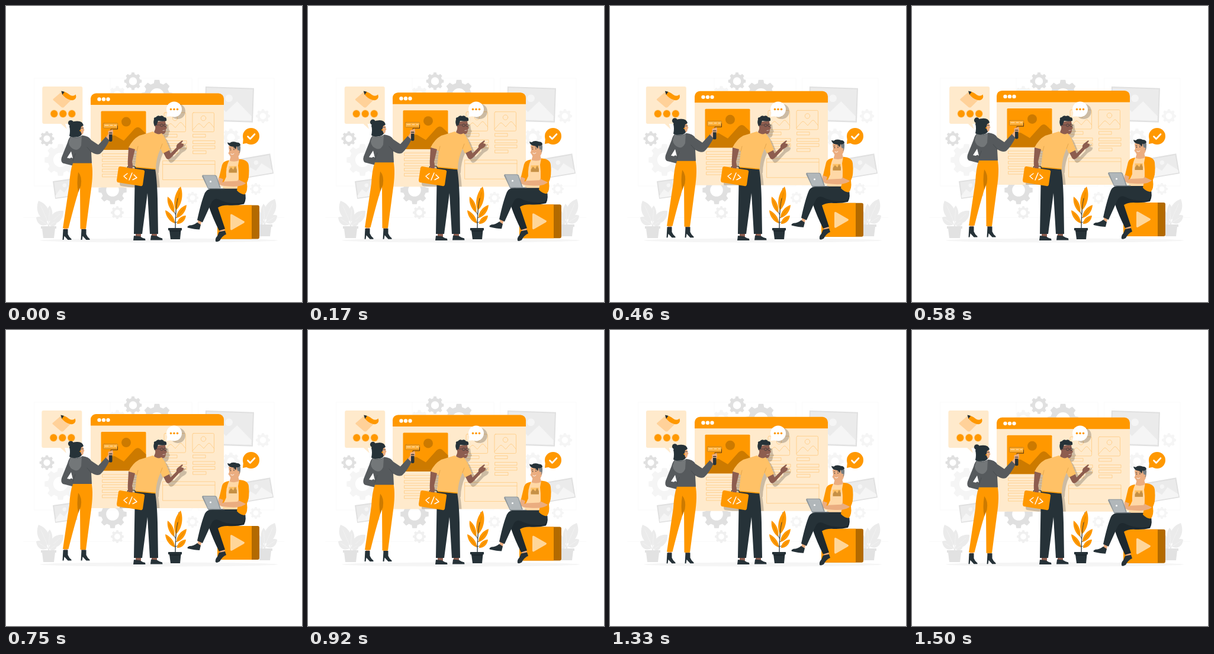
Recreate the animation shown at these times as an HTML page with a canvas. Size 500 by 500 pixels, loop 1540 ms.

```html
<!DOCTYPE html>
<html lang="en">
<head>
<meta charset="utf-8">
<title>Web design team</title>
<style>
  html, body { margin: 0; width: 100%; height: 100%; overflow: hidden; background: #fff; }
  canvas { display: block; width: 100vw; height: 100vh; }
</style>
</head>
<body>
<canvas id="stage"></canvas>
<script>
const LOOP = 1540, LEAD = 55, RISE = 6.2;
const ORANGE = '#ff9800', BROWN = '#cc7a00', CREAM = '#ffeacc', PEACH = '#ffc166',
      LINE = '#ffcb80', DARK = '#263238', GREY = '#e0e0e0', PALE = '#f5f5f5',
      SKIN = '#8d5d4f', TAN = '#ebad80', SHADE = 'rgba(0,0,0,.2)';

const canvas = document.getElementById('stage');
const ctx = canvas.getContext('2d');

const fill = (d, color) => { ctx.fillStyle = color; ctx.fill(new Path2D(d)); };

function line(d, color, width = 1) {
  ctx.strokeStyle = color;
  ctx.lineWidth = width;
  ctx.lineCap = ctx.lineJoin = 'round';
  ctx.stroke(new Path2D(d));
}

function box(x, y, w, h, r, color) {
  ctx.beginPath();
  ctx.roundRect(x, y, w, h, r);
  ctx.fillStyle = color;
  ctx.fill();
}

function frame(x, y, w, h, color = LINE, r = 0) {
  ctx.beginPath();
  ctx.roundRect(x, y, w, h, r);
  ctx.strokeStyle = color;
  ctx.lineWidth = 0.8;
  ctx.stroke();
}

function oval(x, y, rx, color, ry = rx) {
  ctx.beginPath();
  ctx.ellipse(x, y, rx, ry, 0, 0, Math.PI * 2);
  ctx.fillStyle = color;
  ctx.fill();
}

function moved(x, y, angle, draw) {
  ctx.save();
  ctx.translate(x, y);
  ctx.rotate(angle);
  draw();
  ctx.restore();
}

function gear(x, y, r, color, turn = 0) {
  const teeth = 8, step = Math.PI * 2 / teeth;
  ctx.beginPath();
  for (let i = 0; i < teeth; i++) {
    [[-0.32, 0.8], [-0.2, 1], [0.2, 1], [0.32, 0.8]].forEach(([a, k]) => {
      const angle = (i + a) * step + turn;
      ctx.lineTo(x + Math.cos(angle) * r * k, y + Math.sin(angle) * r * k);
    });
  }
  ctx.closePath();
  ctx.moveTo(x + r * 0.45, y);
  ctx.arc(x, y, r * 0.45, 0, Math.PI * 2);
  ctx.fillStyle = color;
  ctx.fill('evenodd');
}

function photo(x, y, w, h, angle) {
  moved(x, y, angle, () => {
    box(0, 0, w, h, 0, GREY);
    box(2, 2, w - 4, h - 4, 0, '#ebebeb');
    oval(w * 0.49, h * 0.32, h * 0.11, PALE);
    ctx.beginPath();
    [[0.03, 0.82], [0.27, 0.5], [0.44, 0.72], [0.66, 0.4], [0.97, 0.82], [0.97, 0.95], [0.03, 0.95]]
      .forEach(([u, v]) => ctx.lineTo(u * w, v * h));
    ctx.fillStyle = PALE;
    ctx.fill();
  });
}

function leaf(x, y, tipX, tipY, width, color, vein) {
  const dx = tipX - x, dy = tipY - y, len = Math.hypot(dx, dy);
  moved(x, y, Math.atan2(dy, dx), () => {
    fill(`M0 0C${len * 0.25} ${-width} ${len * 0.7} ${-width} ${len} 0C${len * 0.7} ${width} ${len * 0.25} ${width} 0 0`, color);
    if (vein) line(`M0 0H${len * 0.75}`, vein, 0.6);
  });
}

function greyPlant(x, y, side) {
  ctx.save();
  ctx.translate(x, y);
  ctx.scale(side, 1);
  line('M0 0Q2 -18 -9 -28M0 0Q3 -14 14 -19M0 0Q-4 -11 -13 -12', '#e8e8e8', 1);
  [[-17, -43, 12], [-21, -15, 9], [2, -35, 7], [25, -26, 11], [14, -9, 7]]
    .forEach(([u, v, w]) => leaf(u * 0.1, v * 0.2, u, v, w, '#ebebeb', PALE));
  fill('M-13 0H13V4H11L9 20H-9L-11 4H-13Z', '#e2e2e2');
  ctx.restore();
}

function background() {
  frame(48, 122, 266, 182, '#f9f9f9');
  frame(325, 122, 128, 182, '#f9f9f9');
  line('M176 122V150', '#fafafa', 0.8);
  line('M30 357H470', '#f9f9f9', 0.8);
  gear(188, 150, 15, PALE);
  gear(92, 260, 27, PALE);
  gear(380, 222, 15, PALE);
  gear(434, 186, 12, PALE);
  gear(422, 309, 10, PALE);
  gear(315, 324, 10, PALE);
  gear(188, 349, 11, '#f0f0f0');
  gear(214.5, 127, 15, GREY);
  gear(255, 151, 26.5, GREY);
  gear(69, 224, 12.5, GREY);
  gear(180, 311, 24, GREY);
  photo(337, 136, 82, 58, 0.035);
  photo(396, 258, 51, 34, -0.17);
  photo(79, 296, 38, 30, -0.14);
  greyPlant(72, 372, 1);
  greyPlant(437, 369, -1);
  oval(258, 396, 201, PALE, 3.5);
}

function browser() {
  box(143, 148, 225, 159, [9, 9, 0, 0], CREAM);
  box(143, 148, 225, 19.5, [9, 9, 0, 0], ORANGE);
  [157.5, 165, 172.5].forEach(x => oval(x, 158, 3.2, '#fff'));

  box(160.5, 178, 76, 65.5, 1.5, ORANGE);
  oval(203, 196, 8, BROWN);
  fill('M161 237L178 221Q182 217 187 221L199 228L217 208Q222 203 227 207L236.5 216V243.5H161Z', BROWN);
  for (let i = 0; i < 5; i++) frame(163, 250 + i * 8.6, 73, 4.8);

  [267, 315].forEach(x => {
    frame(x, 180.5, 36.5, 32.5, LINE, 2);
    ctx.beginPath();
    ctx.arc(x + 18.5, 190, 4.2, 0, Math.PI * 2);
    ctx.stroke();
    line(`M${x} 210l9-10q2-2 4 0l6 6 7-8q2-2 4 0l6.5 8`, LINE, 0.8);
    frame(x + 1, 217, 21, 5);
    frame(x + 1, 228, 37, 5);
    frame(x + 1, 236.5, 37, 5);
    frame(x + 1, 245, 22, 5);
  });
  frame(265, 262, 88, 32);
  line('M265 268H353', LINE, 0.8);
}

function brushBubble() {
  fill('M92 198L103 208L100 198Z', CREAM);
  box(61.5, 136, 68, 63, 3, CREAM);
  fill('M80 159Q79 158 80 157L94 145L110 159L98 171Q96 172 94 171Z', '#ffd199');
  fill('M95 144Q102 145 107 149.5Q113 154 118 149.5Q120 156 115 158.500Q112 160 108 158.5Q100 156 95 149Z', ORANGE);
  fill('M93.5 143.5L99 145L95.5 150Z', DARK);
  [81.5, 96.5, 111.5].forEach(x => {
    oval(x, 182, 6.9, '#ffd699');
    oval(x, 182, 5.9, ORANGE);
  });
}

const MAN = {
  nearArm: 'M207 239L218 242L213 263Q215 271 213 276L207 276Q205 268 206 257Z',
  farArm: 'M265 246L275 242L278 249L288 239Q287 235 291 232L297.5 227L299 228L296 232L300 233Q301 236 297 239L292 242L279 256Q273 262 270 256Z',
  shirt: 'M248 212Q257 219 263 215Q269 222 272 231L277 243L265 249L261 241Q253 258 253 276L218 272L221 245L207 239Q214 225 225 219Z',
  legs: 'M218 272L252 275Q255 292 256 325L257 385H243L239 316L230 385H216Z',
  head: 'M251 196L269 194L270 202L272 206L270 208Q270 216 265 216.5L261 215.5L260 218.5Q254 219 250 213Q253 207 252 204Z'
};
const CASE = 'M193 271L232 277Q235 278 234 281L231 302Q230 305 227 304L189 298Q187 297 187 294L190 273Q191 271 193 271Z';

function manShadow(bottom) {
  ctx.save();
  ctx.beginPath();
  ctx.rect(143, 148, 225, bottom - 148);
  ctx.clip();
  ctx.translate(5, 6);
  const whole = new Path2D();
  Object.values(MAN).forEach(d => whole.addPath(new Path2D(d)));
  whole.addPath(new Path2D(CASE));
  whole.moveTo(299, 172);
  whole.arc(285, 172, 13, 0, Math.PI * 2);
  ctx.fillStyle = SHADE;
  ctx.fill(whole);
  ctx.restore();
}

function shoe(x, y) {
  fill(`M${x} ${y}L${x + 10} ${y + 1}Q${x + 14} ${y + 4} ${x + 19} ${y + 5}L${x + 19.5} ${y + 8}H${x - 1}Z`, DARK);
}

function standingMan() {
  fill('M219 384H228V390H219ZM246 384H255V390H246Z', SKIN);
  shoe(216, 388);
  shoe(245, 387.5);
  fill(MAN.farArm, SKIN);
  fill(MAN.legs, DARK);
  fill(MAN.head, SKIN);
  fill(MAN.shirt, PEACH);
  line('M221 245L223 237M261 241L264 233', '#d99a43', 0.7);
  line('M219 272.5L252 275.5', ORANGE, 1.4);
  fill('M251 203Q248 196 250 192Q249 188 253 188Q256 184 260 186Q265 184 267 188Q272 187 271 194Q264 195.5 257 194Q255 199 254 203Z', DARK);
  oval(253.5, 203, 1.7, SKIN);
  line('M254 201H260', DARK, 0.5);
  ctx.lineWidth = 0.6;
  [263, 269].forEach(x => {
    ctx.beginPath();
    ctx.arc(x, 201.5, 2.3, 0, Math.PI * 2);
    ctx.stroke();
  });
  line('M265 210.5L268 210', '#fff', 0.6);

  line('M205 273Q206 269 211 270L217 271Q219 272 218 275', DARK, 1.2);
  fill(CASE, ORANGE);
  fill(MAN.nearArm, SKIN);
  fill('M203 273L219 275.5L218 281L202 279Z', ORANGE);
  line('M205 283L199 287.5L204 292M213 282L208 294M216 285L221 290L214 293.5', '#fff', 1.5);
}

function chatBubble() {
  fill('M273 178L271 187L281 186Z', '#fff');
  oval(284, 174.5, 13, '#fff');
  [278.5, 284, 289.5].forEach(x => oval(x, 174.5, 1.8, ORANGE));
}

function painter() {
  const boot = x => fill(`M${x} 377.5H${x + 8}L${x + 8} 386Q${x + 10} 391 ${x + 14} 394V395.5H${x + 8}L${x + 2} 389L${x + 1} 395.5H${x - 1}Z`, DARK);
  fill('M98 374H104V379H98ZM127 374H134V379H127Z', TAN);
  boot(96.5);
  boot(127.5);
  fill('M113 265H144.5Q148 282 143.5 312L135 377H125.5L125 306Q117 330 105.5 376H96L107 302Q108 280 113 265Z', ORANGE);
  fill('M122 281Q129 289 126.5 304L122 315Q119 300 122 281Z', BROWN);

  box(164.5, 198.5, 24, 8, 1, '#ffb13b');
  frame(164.5, 198.5, 24, 8, '#b97818', 1);
  line('M167 202H173M176 202H180M183 202H186', CREAM, 1);
  line('M188.5 203V208.5H177V213', '#593b17', 1);

  fill('M110 220Q120 225 129 219Q140 220 144 227L156 235L169 221L175 227Q167 243 159 250Q153 253 144 247L145 266H113L112 270L96 266Q92 263 94 256L104 231Q106 223 110 220Z', '#565a5d');
  fill('M103 257L110 246L113 258Q110 255 108 258Z', '#fff');
  line('M144 247L137 239M113 262L117 250', '#43484b', 0.8);
  fill('M109 221Q120 226 128 220L127 236Q123 245 116 243Q107 240 106 231Z', '#737779');
  fill('M169 222L173 216Q171 211 175 211L180 209Q182 214 180 218L174 227Z', TAN);
  box(174, 213, 5.5, 16.5, 2.2, DARK);
  line('M174 213.5H180M174 216.5H180', TAN, 1.6);

  fill('M123 204L130 203L131 207L132.5 210L131 212Q131 218 126 218L123 221Z', TAN);
  oval(109.5, 198, 4.6, DARK);
  fill('M107 204Q109 195 119 195Q129 194 131 202L127 204.5Q124 211 128 217Q126 222 117 222Q110 222 107 220Q109 211 107 204Z', DARK);
  line('M126 207L131 206.5', DARK, 0.7);
  oval(125.5, 211, 1.2, ORANGE);
}

function playBox() {
  box(357, 337, 71, 57, 3, '#b36a00');
  box(357, 337, 58, 57, [3, 0, 0, 3], ORANGE);
  fill('M379 354Q379 351 382 352.5L402 364Q404 365 402 367L382 378.5Q379 380 379 377Z', '#ffd699');
}

function seatedMan() {
  fill('M361 377L369 376L370 383L362 385ZM325 360L331 362L329 370L323 369Z', TAN);
  fill('M323 366L329 370L327 378Q319 378 307 375Q305 373 310 371Q317 371 323 366Z', DARK);
  fill('M360 382L370 380L372 386Q365 389 361 397Q356 400 354 398Q353 393 357 389Z', DARK);
  fill('M403 313Q407 326 402 335Q390 338 374 337Q364 337 358 341L370 377L360 380Q349 358 343 340L346 318Z', '#1e292f');
  fill('M401 309Q407 326 399 333Q376 336 359 327Q351 324 347 333L332 366L323 362Q330 330 336 316Q340 308 352 309L378 308Z', DARK);

  fill('M380 253H392L395 264Q387 269 377 264Z', TAN);
  fill('M375 261Q387 266 396 260L400 309H366Z', '#ffd8a6');
  fill('M377 261Q367 262 365 269L359 294L366 302L372 289Q371 273 377 261Z', ORANGE);
  fill('M394 259Q409 260 410 270Q412 289 407 299Q409 314 403 319Q395 318 390 312Q395 292 392 270Z', ORANGE);
  box(376.5, 271, 13.5, 11, 0, PEACH);
  fill('M376.5 278L380 273L384 277L387 271L390 277V282H376.5Z', '#c69045');

  fill('M376 237L394 236L395.5 247Q394 257 386 258Q379 257 377.5 252L375.5 249.5L377 246Z', TAN);
  fill('M389 236L396 237Q396.5 246 394 249L391 243Z', '#777d80');
  fill('M374 231L378 232Q382 228 390 231Q396 231 396 236Q392 239 389 237.5Q389 241 388 243Q386 238 382 238Q375 237 374 231Z', DARK);
  oval(392.5, 246, 1.9, TAN);
  oval(379.5, 243.5, 0.8, DARK);
  oval(385, 243, 0.8, DARK);
  line('M378 241L380 240.5M384 240L386.5 240.5', DARK, 0.7);
  line('M380 250.5Q383 252.5 385 250', '#fff', 0.9);

  fill('M406 291L407 298Q400 307 376 305L364 304L361 300L369 297L391 296L397 288Z', TAN);
  fill('M396 286L393 294L406 300L410 289Z', ORANGE);
  fill('M359 290L367 293L364 303L358 302Z', TAN);
  fill('M332 286H353Q355 286 356 288L363 308L341 309L331 288Z', '#8f979b');
  fill('M333 287H352Q354 287 355 289L361 308L342 309Z', '#b1b7ba');
  oval(345.5, 297, 1.5, '#fff');
  line('M342 309H369', '#697379', 1.3);
}

function checkBubble() {
  fill('M401 222L400 233L410 231Z', ORANGE);
  oval(414, 220, 14, ORANGE);
  line('M408.5 220.5L412.5 224.5L420 216.5', '#fff', 2.6);
}

function pottedPlant() {
  line('M286 376Q286 340 292 308M286 366L273 348M286 352L275 326M287 366L301 358M287 358L302 341', DARK, 0.8);
  leaf(287, 345, 295, 305, 8, ORANGE, BROWN);
  leaf(284, 349, 273, 322, 5.5, ORANGE, BROWN);
  leaf(285, 367, 269, 345, 5.5, ORANGE, BROWN);
  leaf(288, 358, 305, 336, 6, ORANGE, BROWN);
  leaf(289, 368, 304, 354, 5.5, ORANGE, BROWN);
  line('M286 376Q286 340 290 325', DARK, 0.8);
  fill('M274 375H297V379H295.5L294 394H278L276 379H274Z', DARK);
  line('M276 380H295', '#11191d', 0.8);
}

// Sideways shake, one step per tenth of the loop.
const SHAKE = [0, -0.5, 1, -2, 2, -2, 2, -2, 1, -0.5, 0];
function shakeAt(phase) {
  const i = Math.floor(phase * 10), part = phase * 10 - i;
  return 1.1 * (SHAKE[i] + (SHAKE[i + 1] - SHAKE[i]) * part);
}

function render(time) {
  const phase = ((time + LEAD) % LOOP) / LOOP;
  const lift = -RISE * (1 - Math.abs(2 * phase - 1));
  const floating = draw => moved(0, lift, 0, draw);
  const ratio = window.devicePixelRatio || 1;
  const width = Math.round(innerWidth * ratio), height = Math.round(innerHeight * ratio);
  if (canvas.width !== width || canvas.height !== height) {
    canvas.width = width;
    canvas.height = height;
  }
  ctx.setTransform(width / 500, 0, 0, height / 500, 0, 0);
  ctx.fillStyle = '#fff';
  ctx.fillRect(0, 0, 500, 500);

  background();
  floating(browser);
  moved(shakeAt(phase), 0, 0, brushBubble);
  manShadow(307 + lift);
  floating(painter);
  standingMan();
  chatBubble();
  pottedPlant();
  floating(() => { playBox(); seatedMan(); });
  checkBubble();
}

const start = performance.now();
function tick() {
  render(performance.now() - start);
  requestAnimationFrame(tick);
}
tick();
</script>
</body>
</html>
```
